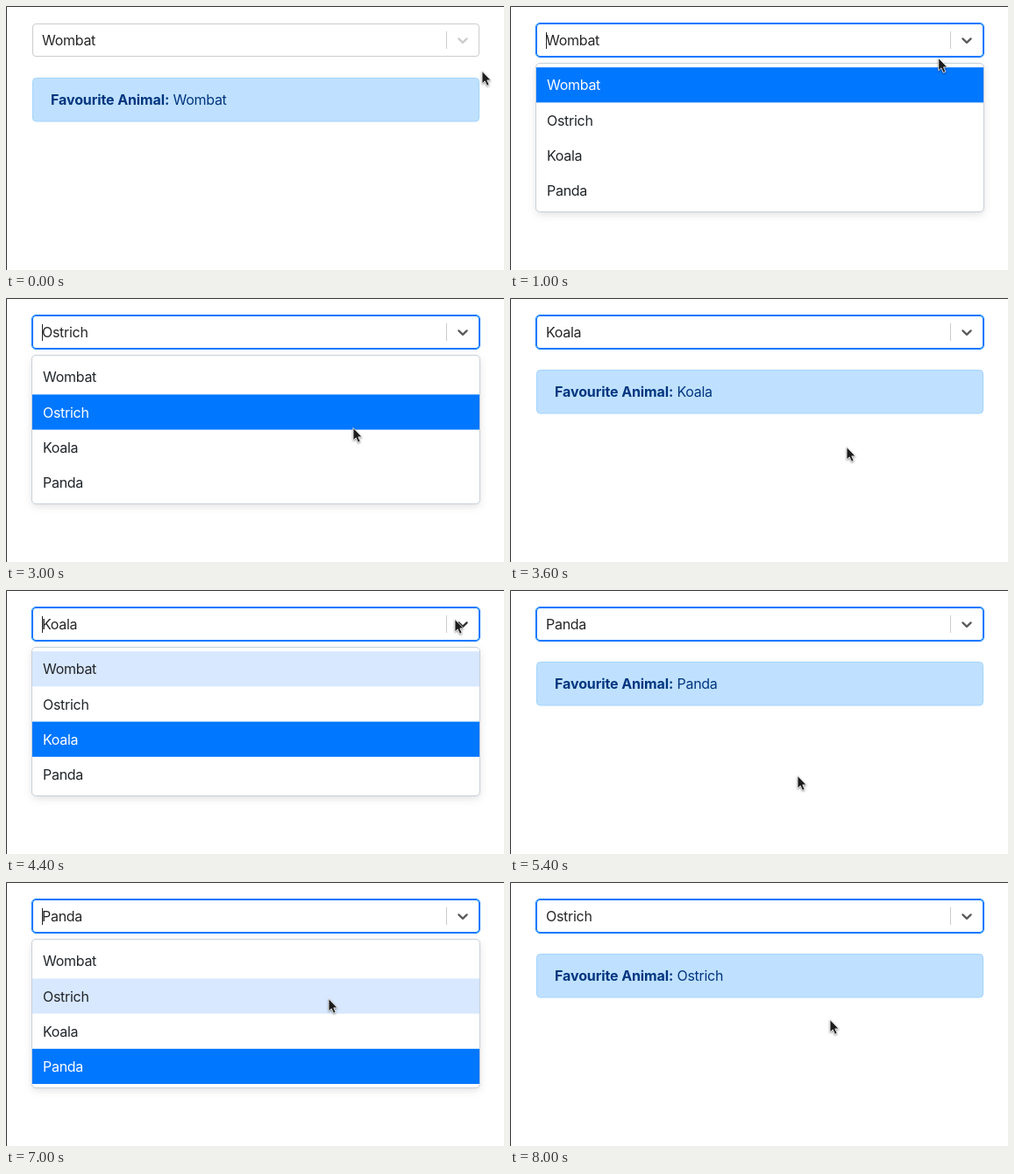
An HTML page for the animation above (8.2 s loop, 568 px wide and 302 px high).

```html
<!DOCTYPE html>
<html lang="en">
<head>
<meta charset="utf-8">
<title>Favourite animal select</title>
<style>
  html, body { margin: 0; width: 100%; height: 100%; overflow: hidden; background: #fff; }
  svg { display: block; width: 568px; height: 302px; }
  text { font: 16px Inter, "Open Sans", sans-serif; letter-spacing: -.28px; fill: #212529; }
  .edge { fill: none; stroke: #333; }
  .control { fill: #fff; stroke: #ccc; }
  .ring { fill: none; stroke: none; }
  .focused .control, .focused .ring { stroke: #0077ff; }
  .value { fill: #262626; }
  .separator { stroke: #ccc; }
  .chevron { fill: none; stroke: #ccc; stroke-width: 2.4; stroke-linecap: round; stroke-linejoin: round; }
  .focused .chevron { stroke: #5c5c5c; }
  .focused .chevron.hover { stroke: #333; }
  .caret { stroke: #222; }
  .alert rect { fill: #bfe1ff; stroke: #a3d4ff; }
  .alert text { fill: #00357f; }
  .alert .label { font-weight: 700; letter-spacing: -.1px; }
  .caret, .menu { visibility: hidden; }
  .open .caret, .open .menu { visibility: visible; }
  .panel { fill: #fff; filter: drop-shadow(0 3px 5px rgba(0, 0, 0, .13)); }
  .rim { fill: none; stroke: #c8d0da; }
  .option rect { fill: none; }
  .option.hover rect { fill: #d8e8ff; }
  .option.chosen rect { fill: #0077ff; }
  .option.chosen text { fill: #fff; }
  .cursor { fill: #1c1c1c; stroke: #fff; stroke-width: .8; stroke-linejoin: round;
    filter: drop-shadow(0 1px 1.2px rgba(0, 0, 0, .45)); }
</style>
</head>
<body>
<svg id="stage" viewBox="0 0 568 302">
  <path class="edge" d="M.5 302V.5H568"/>
  <rect class="control" x="30.5" y="20.5" width="509" height="37" rx="3.5"/>
  <rect class="ring" x="29.5" y="19.5" width="511" height="39" rx="4.5"/>
  <text class="value" x="41" y="45"></text>
  <path class="caret" d="M41.5 30V49"/>
  <path class="separator" d="M502.5 29V49"/>
  <path class="chevron" d="M516.4 37.4L521 41.8L525.6 37.4"/>
  <g class="alert">
    <rect x="30.5" y="82.5" width="509" height="49.5" rx="4"/>
    <text class="label" x="51" y="113">Favourite Animal:</text>
    <text class="value" x="190.5" y="113"></text>
  </g>
  <g class="menu">
    <rect class="panel" x="30" y="66" width="510" height="169" rx="4"/>
    <g id="options"></g>
    <rect class="rim" x="29.5" y="65.5" width="511" height="170" rx="4.5"/>
  </g>
  <path class="cursor" d="M0 -.5V13.8L3.2 10.9L5.6 16.2L8.1 15.1L5.8 9.9H10.1Z"/>
</svg>
<script>
const LOOP = 8200, STEP = 200, MOVE = 600, ROW = 40.2, TOP = 70.2;
const animals = ["Wombat", "Ostrich", "Koala", "Panda"];

// The pointer rests, then takes at most MOVE ms to reach the next stop
const stops = [
  { at: 0, x: 543, y: 75 },
  { at: 400, x: 518, y: 37, does: "open" },
  { at: 1400, x: 405, y: 126, does: "pick" },
  { at: 2400, x: 516, y: 37, does: "open" },
  { at: 3000, x: 396, y: 149 },
  { at: 3600, x: 384, y: 171, does: "pick" },
  { at: 4400, x: 512, y: 34, does: "open" },
  { at: 5200, x: 328, y: 213, does: "pick" },
  { at: 6200, x: 521, y: 38, does: "open" },
  { at: 7000, x: 368, y: 134 },
  { at: 7600, x: 368, y: 134, does: "pick" },
  { at: 8000, x: 365, y: 158 }
];

const stage = document.getElementById("stage");
const find = name => stage.querySelector(name);
const values = stage.querySelectorAll(".value");
const chevron = find(".chevron"), cursor = find(".cursor");
const rowAt = y => Math.max(0, Math.floor((y - TOP) / ROW));

document.getElementById("options").innerHTML = animals.map((name, i) => {
  const y = TOP + i * ROW;
  return `<g class="option"><rect x="30" y="${y}" width="510" height="${ROW}"/>
    <text x="42" y="${y + 26.2}">${name}</text></g>`;
}).join("");
const options = stage.querySelectorAll(".option");

function pointer(t) {
  const last = stops.findLastIndex(s => s.at <= t);
  const a = stops[last], b = stops[last + 1] || a;
  const leave = Math.max(a.at, b.at - MOVE);
  const k = t > leave && b !== a ? (t - leave) / (b.at - leave) : 0;
  const ease = k * k * (3 - 2 * k);
  return [a.x + (b.x - a.x) * ease, a.y + (b.y - a.y) * ease];
}

function draw(t) {
  const [x, y] = pointer(t);
  const clicks = stops.filter(s => s.does && s.at <= t);
  const picked = clicks.findLast(s => s.does === "pick");
  const chosen = picked ? rowAt(picked.y) : 0;

  stage.classList.toggle("focused", clicks.length > 0);
  stage.classList.toggle("open", clicks.at(-1)?.does === "open");
  chevron.classList.toggle("hover", x > 502 && y < 58);
  values.forEach(v => v.textContent = animals[chosen]);
  options.forEach((o, i) => {
    o.classList.toggle("chosen", i === chosen);
    o.classList.toggle("hover", i === rowAt(y));
  });
  cursor.setAttribute("transform", `translate(${x} ${y})`);
}

const start = performance.now();
let last = -1;
function tick() {
  const t = Math.floor((performance.now() - start) % LOOP / STEP) * STEP;
  if (t !== last) draw(last = t);
  requestAnimationFrame(tick);
}
tick();
</script>
</body>
</html>
```
